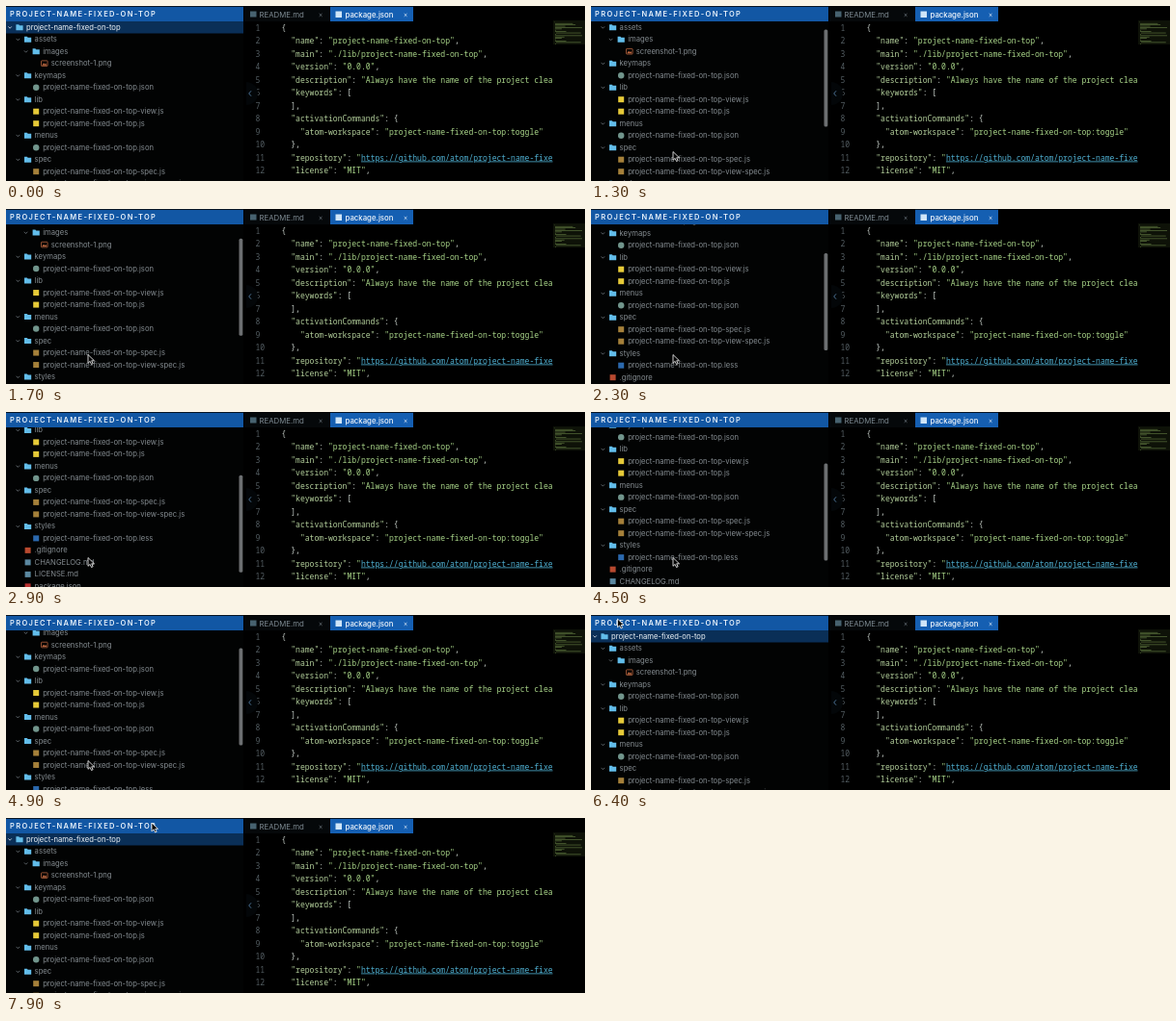
An HTML page for the animation above (8 s loop, 600 by 182 pixels).

```html
<!DOCTYPE html>
<html lang="en">
<head>
<meta charset="utf-8">
<title>Project name fixed on top</title>
<style>
  html, body { margin: 0; width: 100%; height: 100%; overflow: hidden; background: #000; }
  svg { display: block; width: 100vw; height: 100vh; }
  text { white-space: pre; }
  .ui { font-family: Inter, Roboto, "Liberation Sans", sans-serif; }
  .tree { font-size: 7.65px; fill: #858c91; }
  .tree .root { fill: #f0f5f9; }
  .tab { font-size: 7.8px; }
  .code { font: 8.08px "Noto Sans Mono", "DejaVu Sans Mono", monospace; fill: #c6cec8; }
  .num { fill: #535d62; }
  .key { fill: #b4d09c; }
  .str { fill: #a8d488; }
  .url { fill: #4fb0d2; text-decoration: underline; }
</style>
</head>
<body>
<svg id="stage" viewBox="0 0 600 182">
  <defs>
    <clipPath id="treeClip"><rect y="15" width="246" height="167"/></clipPath>
    <clipPath id="codeClip"><rect x="247" y="15" width="319.5" height="167"/></clipPath>
  </defs>
  <rect width="600" height="182" fill="#000"/>
  <rect width="246" height="182" fill="#020303"/>
  <g clip-path="url(#treeClip)">
    <g id="tree" class="ui tree"></g>
    <rect id="thumb" x="241.5" width="3.8" height="101" rx="1.5" fill="#6c6f71"/>
  </g>
  <rect y=".8" width="246" height="15.2" fill="#1257a4"/>
  <text class="ui" x="4" y="11.3" font-size="7.5" font-weight="600" letter-spacing="1.33" fill="#e9f2fb">PROJECT-NAME-FIXED-ON-TOP</text>

  <g class="ui tab">
    <rect x="247" y=".8" width="89" height="15.2" fill="#05080a"/>
    <rect x="253" y="5.5" width="6.5" height="6" fill="#47626f"/>
    <text x="262.5" y="12" fill="#7e8a92">README.md</text>
    <rect x="336" y=".8" width="86" height="15.2" fill="#155fb2"/>
    <rect x="341.5" y="5.5" width="6.5" height="6.5" fill="#cfe5f8"/>
    <text x="351.5" y="12" font-weight="500" fill="#f2f7fc">package.json</text>
    <path d="M324.7 8l2.8 2.8m0-2.8l-2.8 2.8" stroke="#6c777e" stroke-width=".8"/>
    <path d="M412.7 8l2.8 2.8m0-2.8l-2.8 2.8" stroke="#dbe8f5" stroke-width=".8"/>
  </g>

  <g id="code" class="code" clip-path="url(#codeClip)"></g>
  <g id="map"></g>

  <path d="M249 79a12 12 0 0 1 0 24z" fill="#030608"/>
  <path d="M254 88.3l-2.3 2.7 2.3 2.7" fill="none" stroke="#4a6f92" stroke-width="1"/>
  <path id="cursor" d="M0 0V8.8L2.1 6.9 3.5 10 5.1 9.3 3.7 6.3H6.5Z" fill="#050505" stroke="#fff" stroke-width=".8" stroke-linejoin="round"/>
</svg>
<script>
const NS = "http://www.w3.org/2000/svg";
const LOOP = 8000, ROW = 12.5, LINE = 13.45;
const $ = id => document.getElementById(id);

function add(parent, tag, attrs, text) {
  const el = document.createElementNS(NS, tag);
  for (const k in attrs) el.setAttribute(k, attrs[k]);
  if (text !== undefined) el.textContent = text;
  return parent.appendChild(el);
}

const name = "project-name-fixed-on-top";
// depth, label, icon
const rows = [
  [0, name, "dir"],
  [1, "assets", "dir"],
  [2, "images", "dir"],
  [3, "screenshot-1.png", "image"],
  [1, "keymaps", "dir"],
  [2, name + ".json", "json"],
  [1, "lib", "dir"],
  [2, name + "-view.js", "js"],
  [2, name + ".js", "js"],
  [1, "menus", "dir"],
  [2, name + ".json", "json"],
  [1, "spec", "dir"],
  [2, name + "-spec.js", "spec"],
  [2, name + "-view-spec.js", "spec"],
  [1, "styles", "dir"],
  [2, name + ".less", "less"],
  [1, ".gitignore", "git"],
  [1, "CHANGELOG.md", "doc"],
  [1, "LICENSE.md", "doc"],
  [1, "package.json", "npm"],
  [1, "README.md", "doc"]
];
const squares = { js: "#e6ca38", spec: "#a5803a", less: "#2b68ad", git: "#b8492f", npm: "#b9302f", doc: "#5b88a0" };

function drawIcon(g, kind, x, y) {
  if (kind === "dir") {
    add(g, "path", { d: `M${x - 3.6} ${y - 3}h2.8l.9 1h3.5v5h-7.2z`, fill: "#62bdea" });
  } else if (kind === "image") {
    add(g, "rect", { x: x - 3.3, y: y - 2.8, width: 6.6, height: 5.6, rx: .6, fill: "none", stroke: "#b9653f", "stroke-width": .8 });
    add(g, "path", { d: `M${x - 2.6} ${y + 2}l1.8-2.4 1.2 1.3 1-1 1.4 2.1z`, fill: "#b9653f" });
  } else if (kind === "json") {
    add(g, "circle", { cx: x, cy: y, r: 3.2, fill: "#71958c" });
  } else {
    add(g, "rect", { x: x - 3, y: y - 3, width: 6, height: 6, fill: squares[kind] });
  }
}

function buildTree() {
  const g = $("tree");
  add(g, "rect", { y: 15, width: 246, height: 13.5, fill: "#0a2f57" });
  rows.forEach(([depth, label, kind], i) => {
    const y = 22.2 + i * ROW, dx = depth * 8.6;
    if (kind === "dir") {
      add(g, "path", { d: `M${2.4 + dx * .96} ${y - .8}l1.7 1.8 1.7-1.8`, fill: "none", stroke: depth ? "#737c82" : "#dce6ee", "stroke-width": .8 });
    }
    drawIcon(g, kind, 14 + dx, y);
    add(g, "text", { x: 21 + dx, y: y + 2.6, class: depth ? "" : "root" }, label);
  });
}

// # marks a key, ~ a string value, ^ an address
const code = [
  "{",
  `  #"name"#: ~"${name}"~,`,
  `  #"main"#: ~"./lib/${name}"~,`,
  '  #"version"#: ~"0.0.0"~,',
  '  #"description"#: ~"Always have the name of the project clearly visible"~,',
  '  #"keywords"#: [',
  "  ],",
  '  #"activationCommands"#: {',
  `    #"atom-workspace"#: ~"${name}:toggle"~`,
  "  },",
  `  #"repository"#: ~"~^https://github.com/atom/${name}^~"~,`,
  '  #"license"#: ~"MIT"~,'
];
const styles = { "#": "key", "~": "str", "^": "url" };

function buildCode() {
  code.forEach((line, i) => {
    const y = 26 + i * LINE;
    add($("code"), "text", { x: 258.5, y, class: "num" }, i + 1);
    const text = add($("code"), "text", { x: 285.5, y });
    let cls = "";
    for (const part of line.split(/([#~^])/)) {
      const style = styles[part];
      if (style) cls = cls === style ? "" : style;
      else if (part) add(text, "tspan", { class: cls }, part);
    }
  });
}

function buildMap() {
  const g = $("map");
  add(g, "rect", { x: 567, y: 15, width: 33, height: 25, fill: "#0e1208" });
  code.concat(code.slice(5, 10)).forEach((line, i) => {
    const indent = line.search(/\S/);
    const width = Math.min(line.trim().length * .46, 28);
    add(g, "rect", { x: 568 + indent * .5, y: 16.5 + i * 1.4, width, height: .7, fill: "#6b8547", opacity: .8 });
  });
}

// Eased values from a list of [time, ...values]
function track(keys, t) {
  let i = 0;
  while (i < keys.length - 2 && t >= keys[i + 1][0]) i++;
  const [a, b] = [keys[i], keys[i + 1]];
  const u = Math.max(0, Math.min(1, (t - a[0]) / (b[0] - a[0])));
  const e = u * u * (3 - 2 * u);
  return a.slice(1).map((v, k) => v + (b[k + 1] - v) * e);
}

const scrollKeys = [[0, 0], [700, 0], [1300, 12.5], [1450, 12.5], [2150, 47], [2300, 47], [3400, 102], [3600, 102], [5600, 0]];
const cursorKeys = [
  [0, 130, -14], [550, 130, -14], [1100, 85, 151.5], [5650, 85, 151.5],
  [6200, 8, 5], [6400, 27.5, 4], [6800, 130, 5], [7350, 45, 6], [7900, 151, 5]
];
const thumbKeys = [[0, 0], [700, 0], [850, 1], [5600, 1], [6000, 0]];

function draw(t) {
  const [scroll] = track(scrollKeys, t);
  const [x, y] = track(cursorKeys, t);
  $("tree").setAttribute("transform", `translate(0 ${-scroll})`);
  $("thumb").setAttribute("y", 16.5 + scroll * .63);
  $("thumb").setAttribute("opacity", track(thumbKeys, t)[0]);
  $("cursor").setAttribute("transform", `translate(${x} ${y})`);
}

buildTree();
buildCode();
buildMap();
const start = performance.now();
function tick() {
  draw((performance.now() - start) % LOOP);
  requestAnimationFrame(tick);
}
tick();
</script>
</body>
</html>
```
